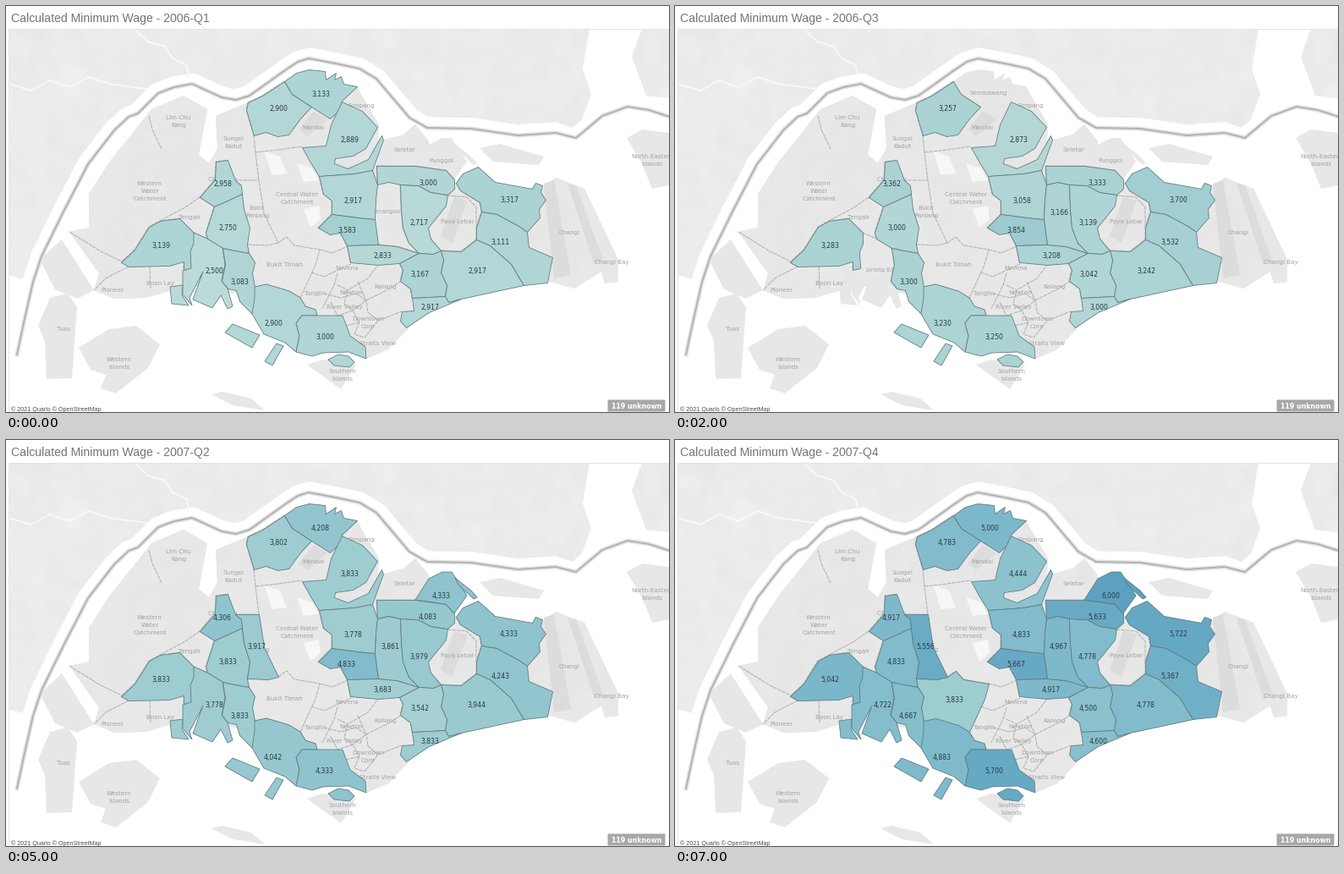
These frames come from a looping animation (784x480 px, 8000 ms). A matplotlib script:

```python
import numpy as np
import matplotlib.pyplot as plt
from matplotlib.animation import FuncAnimation
from matplotlib.collections import PolyCollection
from matplotlib.patches import FancyBboxPatch, Polygon, Rectangle

W, H, DPI = 784, 480, 100
PX = 72 / DPI
SANS, LIB = "DejaVu Sans", "Liberation Sans"
LAND = "#e7e7e7"

fig = plt.figure(figsize=(W / DPI, H / DPI), dpi=DPI, facecolor="white")
ax = fig.add_axes([0, 0, 1, 1])
ax.set_xlim(0, W)
ax.set_ylim(H, 0)
ax.axis("off")
ax.set_autoscale_on(False)


def pairs(flat):
    return np.reshape(flat, (-1, 2)).astype(float)


def text(x, y, s, size, color, font=SANS, ha="center", z=9, **kw):
    return ax.text(x, y, s, fontsize=size * PX, color=color, family=font,
                   ha=ha, va="baseline", zorder=z, **kw)


def shape(*flat, color=LAND, z=2):
    return ax.add_patch(Polygon(pairs(flat), fc=color, ec="none", zorder=z))


def line(pts, color, width, z=3, dash="-"):
    ax.plot(*np.transpose(pts), color=color, lw=width * PX, ls=dash,
            zorder=z, solid_joinstyle="round")


def relief(patch, base, spread, z):
    """Soft random terrain shading inside a land patch."""
    rng = np.random.default_rng(7)
    grey = base + spread * rng.standard_normal((50, 82))
    img = ax.imshow(grey, cmap="gray", vmin=0, vmax=255, zorder=z,
                    extent=(0, W, H, 0), interpolation="bicubic",
                    aspect="auto")
    img.set_clip_path(patch)


def arc(*flat):
    """A district border, dashed on the base map and shared by districts."""
    pts = pairs(flat)
    line(pts, "#a9a9a9", 0.9, 3, (0, (5, 1)))
    return pts


def gap(p, border):
    return min(np.hypot(*(p - border[0])), np.hypot(*(p - border[-1])))


def ring(first, *rest):
    """Join borders end to end, turning each one as needed."""
    if rest and gap(first[0], rest[0]) < gap(first[-1], rest[0]):
        first = first[::-1]
    pts = list(first)
    for part in rest:
        if gap(pts[-1], part[-1:]) < gap(pts[-1], part[:1]):
            part = part[::-1]
        pts.extend(part)
    return pts


# Strait boundary, with the mainland coast running beside it
strait = pairs([
    13, 412, 22, 370, 32, 326, 42, 296, 68, 243, 97, 187, 128, 147,
    145, 131, 156, 127, 180, 103, 199, 96, 220, 92, 255, 108, 272, 111,
    288, 106, 330, 76, 345, 66, 358, 62, 390, 68, 418, 74, 438, 86,
    477, 132, 498, 144, 550, 145, 605, 153, 650, 150, 674, 156, 705, 130,
    735, 119, 760, 123, 785, 131])
line(strait, "#e2e2e2", 5, 3)
line(strait, "#b0b0b0", 1.8, 3.1)
step = np.gradient(strait, axis=0)
step /= np.hypot(*step.T)[:, None]
coast = (strait + 13 * np.column_stack([step[:, 1], -step[:, 0]]))[2:]
north = shape(3, 27, 3, 318, *coast.ravel(), W, 27, color="#ebebeb", z=1)
relief(north, 235, 2.2, 1.1)
shape(690, 27, 752, 27, 740, 60, 757, 106, 790, 110, 790, 131, 735, 119,
      674, 154, 692, 104, 682, 75, color="white", z=1.3)
line(pairs([3, 92, 30, 100, 52, 88, 75, 96, 98, 84, 122, 92, 166, 98]),
     "#f8f8f8", 2, 1.2)
line(pairs([152, 27, 168, 42, 188, 48, 197, 62, 214, 70, 216, 84]),
     "#f8f8f8", 2, 1.2)

# Main island and its neighbours
island = shape(
    75, 267, 98, 262, 98, 222, 124, 182, 150, 150, 172, 122, 210, 106,
    238, 122, 228, 176, 240, 186, 250, 168, 248, 130, 286, 114, 330, 100,
    383, 120, 415, 95, 422, 108, 441, 140, 440, 160, 470, 152, 484, 140,
    500, 160, 500, 190, 532, 209, 600, 240, 650, 203, 684, 216, 724, 300,
    724, 326, 708, 328, 704, 314, 672, 334, 640, 325, 500, 355, 452, 406,
    426, 417, 400, 395, 300, 345, 215, 330, 166, 345, 128, 346, 104, 336,
    110, 316)
relief(island, 231, 1.6, 2.1)
shape(52, 345, 73, 340, 84, 356, 78, 440, 48, 441, 46, 396, 38, 378)
shape(40, 300, 66, 276, 104, 336, 84, 346, 58, 335)
shape(86, 404, 122, 382, 154, 378, 182, 400, 168, 428, 130, 458, 112, 452,
      118, 436, 100, 430)
shape(356, 424, 374, 418, 414, 424, 396, 453)
shape(243, 459, 256, 456, 290, 464, 306, 478, 268, 472)
shape(560, 168, 584, 163, 636, 178, 630, 188, 576, 184)
shape(734, 156, 752, 146, W, 150, W, 212, 764, 216, 752, 186)
shape(636, 210, 648, 206, 668, 318, 648, 322, color="#dcdcdc", z=2.3)
shape(664, 210, 674, 212, 706, 300, 696, 306, color="#dcdcdc", z=2.3)
shape(530, 226, 546, 230, 528, 280, 514, 272, color="#dcdcdc", z=2.3)
shape(364, 124, 380, 134, 356, 154, 346, 146, color="#dcdcdc", z=2.3)
shape(306, 172, 324, 178, 332, 198, 314, 200, color="#f7f7f7", z=2.3)
shape(344, 186, 362, 192, 370, 206, 352, 208, color="#f7f7f7", z=2.3)
shape(352, 240, 370, 236, 372, 252, 360, 262, color="#f7f7f7", z=2.3)

# Borders of districts that never fill
arc(293, 153, 295, 173, 299, 206)
arc(295, 173, 322, 170, 350, 166)
arc(169, 130, 173, 146, 184, 169)
arc(229, 226, 212, 238, 182, 254)
arc(75, 267, 112, 290, 137, 302)
arc(145, 308, 118, 322, 104, 336)
arc(170, 308, 171, 334)
arc(371, 288, 386, 292, 404, 284)
arc(361, 315, 376, 320, 408, 305)
arc(392, 316, 388, 330, 374, 358)
arc(376, 340, 396, 345, 414, 340, 426, 348, 454, 334, 466, 326)
arc(392, 330, 404, 336, 428, 322, 440, 306)
arc(404, 336, 400, 352, 410, 360, 426, 348)
arc(384, 350, 392, 366, 410, 360, 418, 374, 402, 378)
arc(416, 326, 426, 348, 428, 362, 440, 372, 468, 361)
arc(418, 374, 412, 388, 424, 392, 440, 372)
arc(522, 224, 545, 226, 556, 238, 556, 262)

for x, y, name in (
        (204, 131, "Lim Chu\nKang"), (269, 156, "Sungei\nKadut"),
        (170, 209, "Western\nWater\nCatchment"), (217, 249, "Tengah"),
        (256, 204, "Choa Chu"), (297, 238, "Bukit\nPanjang"),
        (344, 222, "Central Water\nCatchment"), (371, 102, "Sembawang"),
        (420, 117, "Simpang"), (363, 143, "Mandai"), (471, 169, "Seletar"),
        (515, 182, "Punggol"), (452, 242, "Serangoon"),
        (534, 254, "Paya Lebar"), (666, 267, "Changi"),
        (716, 302, "Changi Bay"), (764, 177, "North-Eastern\nIslands"),
        (330, 305, "Bukit Timah"), (403, 309, "Novena"),
        (449, 331, "Kallang"), (366, 339, "Tanglin"), (408, 338, "Newton"),
        (400, 355, "River Valley"), (428, 369, "Downtown\nCore"),
        (440, 398, "Straits View"), (126, 335, "Pioneer"),
        (183, 327, "Boon Lay"), (246, 311, "Jurong East"),
        (68, 381, "Tuas"), (134, 417, "Western\nIslands"),
        (398, 431, "Southern\nIslands")):
    for row, part in enumerate(name.split("\n")):
        text(x, y + 2.6 + 9.3 * row, part, 7.3, "#a3a3a3", z=4)

regions = []


def region(x, y, wages, *polys):
    """wages: 2006 Q1, Q2, Q4, then 2007 Q2, Q3, Q4; 0 means no data."""
    a, b, d, f, g, h = wages
    c = round((b + d) / 2) if b and d else 0
    e = round((d + f) / 2) if d and f else 0
    for poly in polys:
        shape(*np.ravel(poly), z=2.05)
    area = ax.add_collection(PolyCollection(
        polys, edgecolors="#5f7b80", linewidths=0.8 * PX, zorder=5))
    label = text(x, y + 2.9, "", 7.8, "#2b3a3e")
    regions.append((area, label, (a, b, c, d, e, f, g, h)))


# North
wood_semb = arc(329, 89, 338, 104, 361, 119)
region(322, 121, (2900, 3222, 3292, 3802, 4375, 4783), ring(
    wood_semb, arc(329, 89, 303, 106, 286, 114, 284, 123, 293, 153, 307, 149,
                   321, 154, 334, 152, 348, 133, 361, 119)))
region(372, 104, (3133, 0, 3600, 4208, 5000, 5000), ring(
    wood_semb, pairs([361, 119, 383, 133, 395, 122, 397, 112, 415, 95,
                      399, 92, 396, 83, 388, 87, 390, 79, 378, 87, 377, 77,
                      358, 75, 343, 79, 329, 89])))
yis_amk = arc(370, 201, 412, 198, 433, 194)
region(406, 158, (2889, 2690, 3056, 3833, 4267, 4444), ring(
    yis_amk, pairs([433, 194, 446, 158, 444, 153, 428, 181, 404, 192,
                    388, 186, 389, 180, 410, 177, 425, 168, 439, 143,
                    421, 124, 397, 113, 384, 140, 378, 165, 350, 167,
                    360, 185, 370, 201])))

# Centre and north-east
amk_bish = arc(385, 246, 424, 251, 436, 252)
amk_ser = arc(439, 211, 437, 228, 436, 252)
bish_ser = arc(436, 252, 440, 282)
bish_toa = arc(403, 283, 440, 282)
ser_toa = arc(440, 282, 462, 284, 488, 292)
ser_hou = arc(466, 211, 467, 240, 469, 262, 476, 280, 488, 292)
ser_seng = arc(439, 211, 452, 208, 466, 211)
hou_seng = arc(466, 211, 487, 212, 502, 220, 522, 223)
seng_pung = arc(484, 189, 520, 194, 530, 205)
toa_gey = arc(465, 304, 488, 292)
hou_gey = arc(488, 292, 505, 293, 514, 289)
region(410, 230, (2917, 3000, 3117, 3778, 4778, 4833), ring(
    yis_amk, arc(433, 194, 439, 211), amk_ser, amk_bish,
    arc(385, 246, 385, 230, 375, 222, 370, 201)))
region(403, 265, (3583, 3667, 4042, 4833, 5333, 5667), ring(
    amk_bish, bish_ser, bish_toa,
    arc(403, 283, 395, 268, 383, 270, 369, 262, 385, 246)))
region(445, 295, (2833, 3083, 3333, 3683, 4333, 4917), ring(
    bish_toa, ser_toa, toa_gey, arc(465, 304, 440, 306, 407, 303, 403, 283)))
region(454, 244, (0, 3333, 3000, 3861, 4250, 4967), ring(
    ser_seng, ser_hou, ser_toa, bish_ser, amk_ser))
region(488, 256, (2717, 3167, 3111, 3979, 4467, 4778), ring(
    hou_seng, arc(522, 223, 520, 236, 499, 262, 502, 275, 514, 289),
    hou_gey, ser_hou))
region(499, 209, (3000, 3333, 3333, 4083, 5233, 5633), ring(
    seng_pung, arc(530, 205, 530, 216, 522, 223), hou_seng, ser_seng,
    arc(439, 211, 438, 189, 484, 189)))
region(515, 184, (0, 0, 0, 4333, 5000, 6000), ring(
    seng_pung, pairs([530, 205, 545, 184, 527, 156, 516, 156, 500, 164,
                      484, 189])),
    pairs([531, 163, 550, 178, 557, 186, 553, 188, 535, 171]))

# East
pas_tam = arc(562, 243, 580, 246, 606, 260, 616, 267)
tam_bed = arc(556, 276, 572, 283, 597, 305, 607, 322, 612, 330)
bed_gey = arc(514, 289, 517, 300, 514, 315, 521, 330, 519, 343)
gey_mar = arc(519, 343, 480, 345)
bed_mar = arc(519, 343, 523, 350, 538, 346)
region(595, 229, (3317, 3444, 3956, 4333, 5111, 5722), ring(
    pas_tam, pairs([616, 267, 631, 250, 630, 240, 638, 229, 632, 220,
                    634, 212, 626, 209, 622, 216, 578, 208, 558, 190,
                    540, 198, 532, 209]),
    arc(532, 209, 537, 218, 560, 232, 562, 243)))
region(585, 279, (3111, 3438, 3625, 4243, 5125, 5367), ring(
    pas_tam, pairs([616, 267, 618, 285, 646, 297, 640, 327, 612, 330]),
    tam_bed, arc(556, 276, 556, 262, 562, 243)))
region(557, 313, (2917, 3150, 3333, 3944, 4722, 4778), ring(
    tam_bed, pairs([612, 330, 538, 346]), bed_mar, bed_gey,
    arc(514, 289, 538, 290, 556, 276)))
region(489, 317, (3167, 3000, 3083, 3542, 4383, 4500), ring(
    toa_gey, hou_gey, bed_gey, gey_mar,
    arc(480, 345, 478, 334, 466, 325, 469, 312, 465, 304)))
region(501, 356, (2917, 3000, 3000, 3833, 4917, 4600), ring(
    gey_mar, bed_mar, pairs([538, 346, 500, 362, 473, 380, 466, 372,
                             468, 361, 482, 360, 480, 345])))

# West and south
cck_bat = arc(279, 222, 262, 230, 246, 237)
cck_pan = arc(271, 206, 278, 212, 279, 222)
pan_bat = arc(279, 222, 281, 240, 288, 262, 285, 282)
bat_clem = arc(256, 286, 270, 289, 287, 292)
bat_jur = arc(238, 275, 256, 286)
jur_clem = arc(256, 286, 259, 305, 255, 325, 262, 334)
jur_west = arc(222, 268, 222, 281, 218, 290, 219, 310)
pan_tim = arc(285, 282, 310, 283, 322, 280)
bat_tim = arc(285, 282, 287, 292)
clem_tim = arc(287, 292, 294, 303, 291, 316, 294, 332)
clem_que = arc(294, 332, 294, 345, 291, 364)
que_tim = arc(294, 332, 308, 329, 335, 337, 348, 345)
que_mer = arc(368, 366, 350, 366, 343, 375, 347, 390, 343, 409)
region(256, 210, (2958, 3167, 3556, 4306, 5067, 4917), ring(
    cck_bat, cck_pan, arc(271, 206, 262, 182, 248, 184, 247, 205, 229, 226,
                          246, 237)))
region(262, 262, (2750, 2917, 3083, 3833, 4389, 4833), ring(
    cck_bat, pan_bat, bat_tim, bat_clem, bat_jur,
    arc(238, 275, 236, 268, 246, 237)))
region(296, 244, (0, 0, 0, 3917, 4667, 5556), ring(
    cck_pan, pan_bat, pan_tim, arc(322, 280, 305, 245, 299, 206, 271, 206)))
region(183, 283, (3139, 3233, 3333, 3833, 4500, 5042), ring(
    jur_west, arc(219, 310, 210, 312, 210, 302, 193, 307, 145, 308, 136, 303,
                  152, 288, 169, 261, 182, 254, 205, 251, 222, 268)))
region(246, 313, (2500, 3222, 0, 3778, 4422, 4722), ring(
    arc(222, 268, 238, 275), bat_jur, jur_clem,
    pairs([262, 334, 268, 355, 262, 358, 254, 342, 244, 357, 221, 347,
           233, 314, 217, 345, 220, 354, 209, 341, 209, 313, 219, 310]),
    jur_west),
    pairs([194, 332, 209, 330, 208, 342, 216, 354, 196, 352]))
region(276, 326, (3083, 3267, 3333, 3833, 4250, 4667), ring(
    bat_clem, clem_tim, clem_que,
    pairs([291, 364, 276, 349, 272, 336, 262, 334]), jur_clem))
region(316, 375, (2900, 3292, 3167, 4042, 5111, 4883), ring(
    que_tim, arc(348, 345, 354, 355, 366, 359, 368, 366), que_mer,
    pairs([343, 409, 330, 398, 305, 388, 291, 364]), clem_que),
    pairs([268, 376, 300, 389, 291, 404, 259, 386]),
    pairs([320, 399, 328, 402, 315, 425, 306, 420]))
region(377, 391, (3000, 3333, 3167, 4333, 5222, 5700), ring(
    que_mer, pairs([343, 409, 362, 414, 375, 410, 405, 409, 426, 417,
                    425, 403, 407, 390, 398, 366, 368, 366])),
    pairs([381, 418, 393, 412, 405, 414, 412, 421, 406, 427, 388, 425]))
region(330, 307, (0, 0, 0, 0, 0, 3833), ring(
    clem_tim, bat_tim, pan_tim,
    arc(322, 280, 332, 273, 341, 283, 371, 288, 366, 306, 348, 345),
    que_tim))

# Frame, title, credits and badge
ax.add_patch(Rectangle((0, 0), W, 26, fc="white", zorder=7))
line(pairs([3.5, H, 3.5, 26.5, W, 26.5]), "#e4e4e4", 1, 8)
title = text(6, 19, "", 14, "#757575", LIB, "left")
text(6, 479, "© 2021 Quarlo © OpenStreetMap", 7.1, "#4d4d4d", LIB, "left")
ax.add_patch(FancyBboxPatch((712.5, 466.5), 66, 12, fc="#a8a8a8", ec="none",
                            boxstyle="round,pad=1,rounding_size=1",
                            zorder=8))
text(746, 475.5, "119 unknown", 7.9, "white", weight="bold")

STOPS = (2500, 3500, 4300, 5000, 6000)
RAMP = np.array([(187, 219, 216), (167, 209, 211), (144, 196, 206),
                 (124, 184, 203), (92, 162, 192)]) / 255


def shade(wage):
    return [np.interp(wage, STOPS, RAMP[:, k]) for k in range(3)]


def draw(i):
    title.set_text(f"Calculated Minimum Wage - {2006 + i // 4}-Q{i % 4 + 1}")
    for area, label, wages in regions:
        wage = wages[i]
        area.set_visible(wage > 0)
        label.set_text(f"{wage:,}" if wage else "")
        area.set_facecolor(shade(wage))
    return []


anim = FuncAnimation(fig, draw, frames=8, interval=1000, repeat=True,
                     repeat_delay=0, init_func=lambda: draw(0))
plt.show()
```
